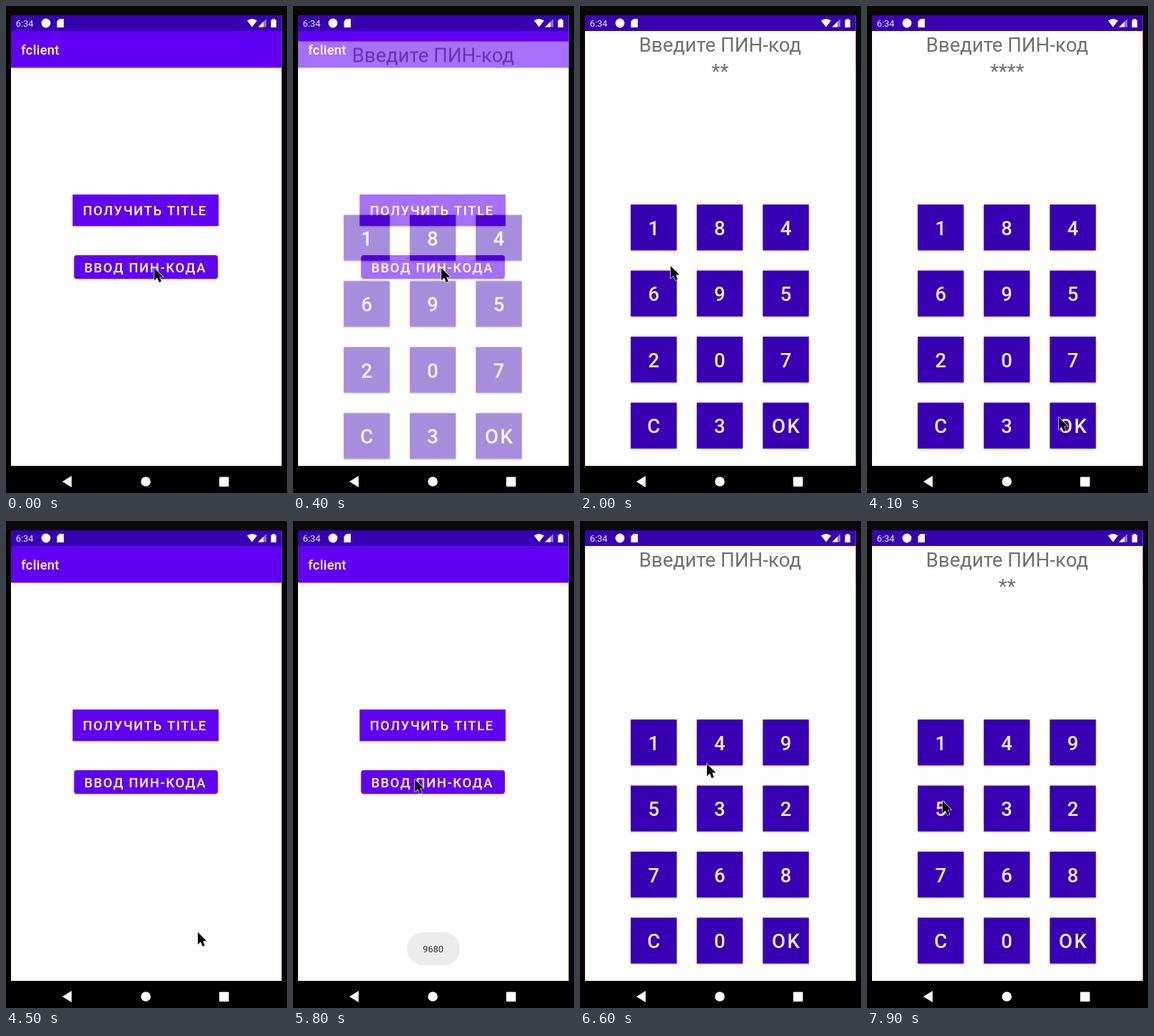
An HTML page that plays this animation: 394x682 px, repeating every 8000 ms.

```html
<!DOCTYPE html>
<html lang="ru">
<head>
<meta charset="utf-8">
<title>PIN pad</title>
<style>
  html, body { margin: 0; width: 100%; height: 100%; overflow: hidden; background: #000; }
  svg { display: block; width: 394px; height: 682px; font-family: Roboto, "Noto Sans", sans-serif; }
  .anim { animation: 8s linear infinite; }
  .caps { font-size: 18.46px; font-weight: 500; letter-spacing: .0893em; fill: #fff; }
  .raised { filter: drop-shadow(0 1px 1px rgba(0, 0, 0, .28)); }
  .key text { font-size: 27.7px; font-weight: 500; letter-spacing: .0893em; text-anchor: middle; fill: #eeebf7; }
  .head { font-size: 27.7px; text-anchor: middle; fill: #707070; }
  .star { animation-timing-function: step-end; opacity: 0; }

  /* 1% = 80 ms */
  #pad1 { animation-name: pad1; }
  #pad2 { animation-name: pad2; }
  #toast { animation-name: toast; }
  #cursor { animation-name: cursor; animation-timing-function: ease-in-out; }

  @keyframes pad1 {
    0%, 3.75% { opacity: 0; transform: translateY(26px); animation-timing-function: ease-out; }
    8%, 53.125% { opacity: 1; transform: none; animation-timing-function: ease-in; }
    56.25% { opacity: 0; transform: translateY(26px); }
    100% { opacity: 0; }
  }
  @keyframes pad2 {
    0%, 74.5% { opacity: 0; transform: translateY(26px); animation-timing-function: ease-out; }
    78.75%, 100% { opacity: 1; transform: none; }
  }
  @keyframes toast {
    0%, 56.5% { opacity: 0; }
    59%, 77.5% { opacity: 1; }
    80%, 100% { opacity: 0; }
  }
  @keyframes cursor {
    0%, 6.25% { transform: translate(208px, 367px); }
    11.25%, 15.5% { transform: translate(193px, 402px); }
    20%, 23% { transform: translate(101px, 400px); }
    25% { transform: translate(127px, 364px); }
    28.5%, 32% { transform: translate(194px, 310px); }
    37%, 41.5% { transform: translate(196px, 490px); }
    48.5%, 56% { transform: translate(269px, 576px); }
    66.5%, 77% { transform: translate(171px, 362px); }
    82.5% { transform: translate(178px, 340px); }
    84.5%, 88% { transform: translate(190px, 310px); }
    93.5%, 100% { transform: translate(106px, 392px); }
  }
  @keyframes a1 { 0% { opacity: 0; } 15% { opacity: 1; } 22.5%, 100% { opacity: 0; } }
  @keyframes a2 { 0% { opacity: 0; } 22.5% { opacity: 1; } 31.25%, 100% { opacity: 0; } }
  @keyframes a3 { 0% { opacity: 0; } 31.25% { opacity: 1; } 40%, 100% { opacity: 0; } }
  @keyframes a4 { 0% { opacity: 0; } 40%, 100% { opacity: 1; } }
  @keyframes b1 { 0% { opacity: 0; } 87.5% { opacity: 1; } 96.25%, 100% { opacity: 0; } }
  @keyframes b2 { 0% { opacity: 0; } 96.25%, 100% { opacity: 1; } }
</style>
</head>
<body>
<svg viewBox="0 0 394 682">
  <defs>
    <clipPath id="page"><rect x="7" y="35" width="379.5" height="609"/></clipPath>
  </defs>

  <rect width="394" height="682"/>
  <rect width="394" height="13" fill="#090909"/>
  <rect x="386.5" width="7.5" height="644" fill="#090909"/>
  <rect x="7" y="13" width="379.5" height="631" fill="#fefefe"/>

  <g id="menu">
    <rect x="7" y="35" width="379.5" height="51.5" fill="#6100f3"/>
    <text x="21.3" y="68" font-size="18.46" font-weight="500" letter-spacing=".23" fill="#fff">fclient</text>
    <rect class="raised" x="93.5" y="264" width="204.5" height="44" fill="#6100f3"/>
    <text class="caps" x="107.8" y="293">ПОЛУЧИТЬ TITLE</text>
    <rect class="raised" x="95.5" y="349" width="201.5" height="33" rx="3.7" fill="#6100f3"/>
    <text class="caps" x="109.8" y="372.7">ВВОД ПИН-КОДА</text>
  </g>

  <g clip-path="url(#page)">
    <g id="pad1" class="anim"></g>
    <g id="pad2" class="anim"></g>
  </g>

  <g id="toast" class="anim">
    <rect x="160" y="576" width="74" height="46" rx="22" fill="#ebebeb"/>
    <text x="196.5" y="604" font-size="12.9" text-anchor="middle" fill="#333">9680</text>
  </g>

  <rect x="7" y="13" width="379.5" height="22" fill="#3800b2"/>
  <g fill="#fff">
    <text x="13.7" y="28.7" font-size="12.9" fill="#eeeaf8">6:34</text>
    <circle cx="56" cy="24" r="6.4"/>
    <path d="M75 18h6v12h-9.5v-8.5z"/>
    <path d="M338 20.5q7-5.2 14 0l-7 9z"/>
    <path d="M365 18v11.5h-11.5z" fill-opacity=".45"/>
    <path d="M361 22v7.500h-7.500z"/>
    <path d="M373.500 18h3.500v1.500h2v10.500h-7.500v-10.500h2z"/>
    <path d="M79 666l13-8v16z"/>
    <circle cx="196" cy="666" r="6.8"/>
    <rect x="299" y="659.500" width="13.500" height="13.500" rx="1"/>
  </g>

  <path id="cursor" class="anim" d="M0 0V17.200L4 13.500L6.700 20L9.800 18.700L7.100 12.400H12.400Z"
    stroke="#fff" stroke-width="1.300" stroke-linejoin="round" paint-order="stroke"/>
</svg>

<script>
  const key = (label, i) => {
    const x = 71.2 + (i % 3) * 92.6;
    const y = 278 + Math.floor(i / 3) * 92.5;
    return `<g class="key">
      <rect class="raised" x="${x}" y="${y}" width="64.4" height="64.2" fill="#3800b2"/>
      <text x="${x + 33.4}" y="${y + 42.5}">${label}</text></g>`;
  };

  const star = (name, i) =>
    `<text class="head star anim" style="animation-name:${name}" x="196.5" y="101">${'*'.repeat(i + 1)}</text>`;

  function buildPad(id, labels, stars) {
    document.getElementById(id).innerHTML = `
      <rect x="7" y="35" width="379.5" height="609" fill="#fefefe"/>
      <text class="head" x="196.5" y="64.3">Введите ПИН-код</text>
      ${stars.map(star).join('')}
      ${labels.map(key).join('')}`;
  }

  buildPad('pad1', [1, 8, 4, 6, 9, 5, 2, 0, 7, 'C', 3, 'OK'], ['a1', 'a2', 'a3', 'a4']);
  buildPad('pad2', [1, 4, 9, 5, 3, 2, 7, 6, 8, 'C', 0, 'OK'], ['b1', 'b2']);
</script>
</body>
</html>
```
